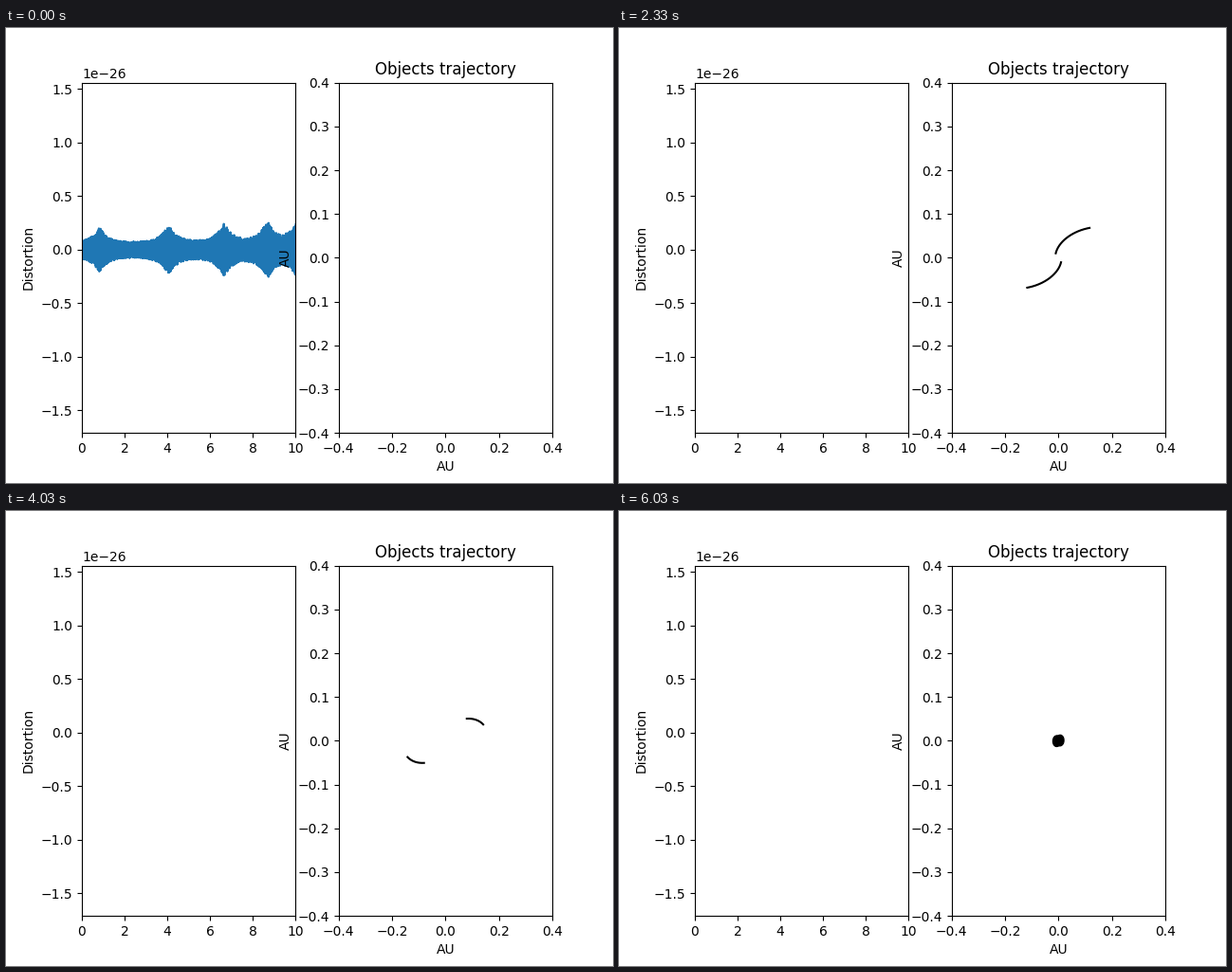
Recreate the animation shown at these times as a matplotlib script. Size 640x480 px, loop 6.13 s.

```python
import numpy as np
import matplotlib.pyplot as plt
from matplotlib.animation import FuncAnimation

TICK = 10            # ms per animation frame
TICKS = 613          # one loop is 6130 ms
STEP = 100           # ms covered by one piece of trail
TILT = np.radians(6.5)
KEPLER = 19800       # period in ms = KEPLER * a ** 1.5
LIMIT = 0.4

# Orbital periods: slow decay first, then a geometric plunge.
PERIODS = np.concatenate([
    [3200, 1615, 974, 663, 479, 360, 273, 211, 174],
    143 * 0.8 ** np.arange(25),
])
FIRST_PASS = 612
PASSES = FIRST_PASS + np.concatenate([[0], np.cumsum(PERIODS[1:])])


def body_path(t):
    """Position of one body (AU) at times t; the other is its mirror point."""
    k = np.searchsorted(PASSES, t, side="right")
    period = PERIODS[k]
    a = (period / KEPLER) ** (2 / 3)
    near = 0.0125 * a / (a + 0.0105)
    e = 1 - near / a

    phase = (t - PASSES[np.maximum(k - 1, 0)]) / period
    mean = 2 * np.pi * (phase - np.round(phase))
    size, sign = np.abs(mean), np.sign(mean)
    ecc = np.full_like(size, np.pi)
    for _ in range(20):
        ecc -= (ecc - e * np.sin(ecc) - size) / (1 - e * np.cos(ecc))

    along = a * (np.cos(ecc) - e)
    across = sign * a * np.sqrt(1 - e ** 2) * np.sin(ecc)
    c, s = np.cos(TILT), np.sin(TILT)
    # Closest approach points left, motion is clockwise.
    return -along * c - across * s, -along * s + across * c


def waveform():
    rng = np.random.default_rng(4)
    x = np.linspace(0, 10, 1500)
    envelope = 0.066 + 0.002 * x
    for centre, height in [(0.82, 0.15), (4.07, 0.17), (6.65, 0.18),
                           (8.67, 0.19), (10.05, 0.17)]:
        envelope += height * np.exp(-np.abs(x - centre) / 0.4)
    swing = np.where(np.arange(x.size) % 2, 1, -1)
    return x, swing * envelope * rng.uniform(0.62, 1, x.size) * 1e-26


def snapshot():
    fig.canvas.draw()
    return np.asarray(fig.canvas.buffer_rgba()).copy()


fig, (left, right) = plt.subplots(1, 2, figsize=(6.4, 4.8), dpi=100)
left.set(xlim=(0, 10), ylim=(-1.71e-26, 1.561e-26), ylabel="Distortion")
right.set(xlim=(-LIMIT, LIMIT), ylim=(-LIMIT, LIMIT),
          xlabel="AU", ylabel="AU", title="Objects trajectory")
box = right.get_position()

# The charts never change, so they are drawn once and reused as a backdrop.
empty_chart = snapshot()
left.plot(*waveform(), color="C0", lw=1.5)
wave_chart = snapshot()

fig.clear()
backdrop = fig.figimage(wave_chart, zorder=-1)
stage = fig.add_axes(box)
stage.set(xlim=(-LIMIT, LIMIT), ylim=(-LIMIT, LIMIT))
stage.axis("off")
trails = [stage.plot([], [], color="black", lw=1.5)[0] for _ in range(2)]


def step_at(tick):
    """Index of the picture on show; the second one is held for only 30 ms."""
    if tick < 10:
        return 0
    return 1 if tick < 13 else 2 + (tick - 13) // 10


def update(tick):
    step = step_at(tick)
    backdrop.set_data(empty_chart if step else wave_chart)
    if step:
        head = STEP * step - 70
        x, y = body_path(np.linspace(head - STEP, head, 500))
    else:
        x = y = np.array([])
    trails[0].set_data(x, y)
    trails[1].set_data(-x, -y)
    return [backdrop, *trails]


anim = FuncAnimation(fig, update, frames=TICKS, interval=TICK,
                     init_func=lambda: update(0), repeat=True,
                     repeat_delay=0, cache_frame_data=False)
plt.show()
```
